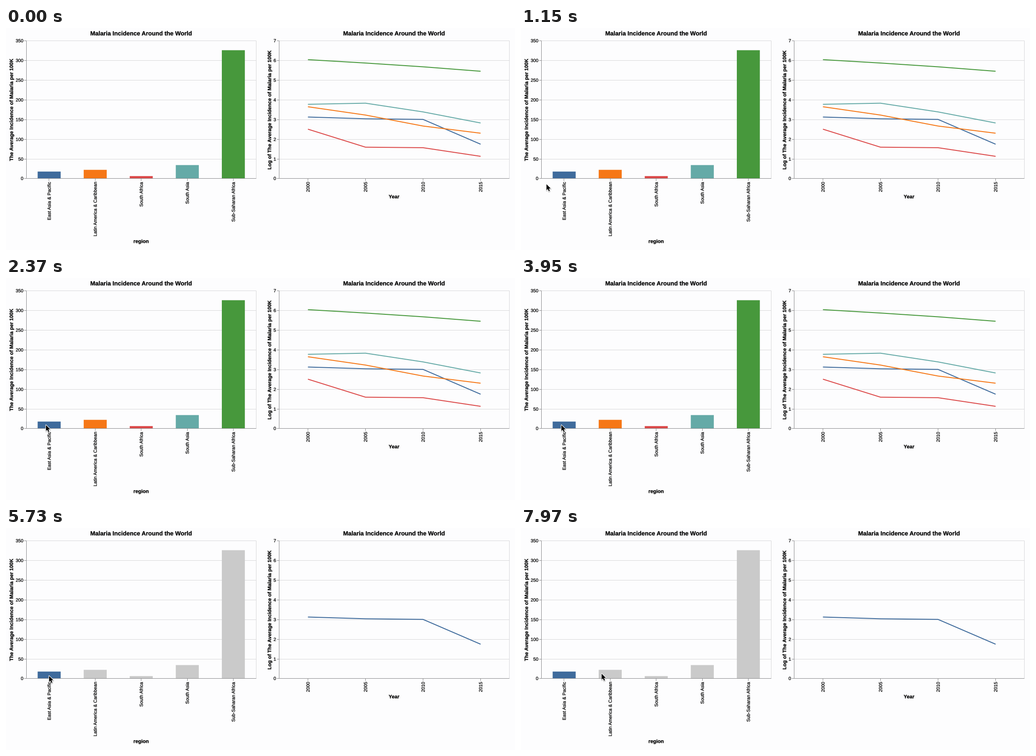
A matplotlib script that plays this animation: 1132 by 495 pixels, repeating every 7990 ms.

```python
import numpy as np
import matplotlib.pyplot as plt
from matplotlib.animation import FuncAnimation
from matplotlib.patches import PathPatch, Polygon, Rectangle
from matplotlib.textpath import TextPath
from matplotlib.transforms import Affine2D

W, H, DPI = 1132, 495, 100
FRAMES, STEP = 235, 34
SELECT_AT = 5500

PX = 72 / DPI
TOP, BASE = 28.9, 335.9
LEFT_X, RIGHT_X, PLOT_W = 45, 607.5, 512
GRID, AXIS, MUTED = "#d7d7d9", "#88888a", "#cacaca"

# name, colour, bar value, log values for each year
REGIONS = [
    ("East Asia & Pacific", "#3f6b9c", 18, (3.133, 3.044, 3.012, 1.751)),
    ("Latin America & Caribbean", "#f67716", 22.4, (3.655, 3.233, 2.675, 2.31)),
    ("South Africa", "#dc4a4a", 6.5, (2.515, 1.6, 1.573, 1.135)),
    ("South Asia", "#65aaa7", 34.5, (3.78, 3.837, 3.393, 2.83)),
    ("Sub-Saharan Africa", "#47983c", 326.5, (6.05, 5.878, 5.686, 5.46)),
]
YEARS = (2000, 2005, 2010, 2015)

# time, x and y of the pointer tip
PATH = np.array([
    (780, -12, 379), (1150, 57, 347), (1230, 57, 347), (1600, 88, 327),
    (2510, 88, 327), (3230, 89, 327), (4610, 89, 327), (5190, 95, 329),
    (7250, 95, 329), (7990, 179, 324),
])
ARROW = np.array([
    (0.8, 0.8), (0.8, 14.2), (3.8, 11.4), (5.9, 16.4),
    (8.2, 15.4), (6.1, 10.5), (10.2, 10.3),
])

fig = plt.figure(figsize=(W / DPI, H / DPI), dpi=DPI, facecolor="#fdfdfe")
ax = fig.add_axes([0, 0, 1, 1])
ax.set_xlim(0, W)
ax.set_ylim(H, 0)
ax.axis("off")


def crisp(v):
    return np.floor(v) + 0.5


def scale_y(value, top_value):
    return BASE - (BASE - TOP) * value / top_value


def rule(x0, y0, x1, y1, color, z):
    ax.plot([x0, x1], [y0, y1], color=color, lw=PX, zorder=z,
            solid_capstyle="butt", snap=False)


def label(x, y, text, size=10.24, align=0.5, bold=False, upright=False):
    """Text as outlines; align runs from 0 (start) to 1 (end) of the line."""
    font = {"family": "Liberation Sans", "weight": "bold" if bold else "normal"}
    path = TextPath((0, 0), text, size=size, prop=font)
    box = path.get_extents()
    place = Affine2D().translate(-box.x0 - align * box.width, 0).scale(1, -1)
    if upright:
        place.rotate_deg(-90)
    place.translate(x, y)
    ax.add_patch(PathPatch(place.transform_path(path), fc="black", ec="black",
                           lw=0.3 * PX, zorder=5, snap=False))


def draw_frame(x0, top_value, tick, y_title, y_title_x, x_title, x_title_y):
    left, right, bottom = crisp(x0), crisp(x0 + PLOT_W - 0.5), crisp(BASE)
    for value in range(0, top_value + 1, tick):
        y = crisp(scale_y(value, top_value))
        rule(left, y, right, y, GRID, 1)
        rule(left - 5, y, left, y, AXIS, 4)
        label(left - 7.3, y + 3.4, str(value), align=1)
    rule(right, crisp(TOP), right, bottom, GRID, 1)
    rule(left, crisp(TOP), left, bottom, AXIS, 4)
    rule(left, bottom, right, bottom, AXIS, 4)
    mid = x0 + PLOT_W / 2 - 0.5
    label(mid, 16.5, "Malaria Incidence Around the World", 13.31, bold=True)
    label(mid, x_title_y, x_title, 11.26, bold=True)
    label(y_title_x, 182.5, y_title, 11.26, bold=True, upright=True)


def x_tick(x, text):
    rule(crisp(x), BASE, crisp(x), BASE + 5, AXIS, 4)
    label(x + 3.6, 343.4, text, align=1, upright=True)


draw_frame(LEFT_X, 350, 50, "The Average Incidence of Malaria per 100K", 15.8,
           "region", 479.3)
draw_frame(RIGHT_X, 7, 1, "Log of The Average Incidence of Malaria per 100K",
           589.8, "Year", 379.8)

band = PLOT_W / len(REGIONS)
year_x = [RIGHT_X + PLOT_W * (i + 0.5) / len(YEARS) for i in range(len(YEARS))]
bars, lines = [], []
for i, (name, color, value, logs) in enumerate(REGIONS):
    x = LEFT_X + band * (i + 0.5)
    y = scale_y(value, 350)
    bar = Rectangle((x - band / 4 - 0.2, y), band / 2, BASE - y, fc=color,
                    lw=0, zorder=2, snap=False)
    bars.append(ax.add_patch(bar))
    x_tick(x - 0.3, name)
    lines += ax.plot(year_x, [scale_y(v, 7) for v in logs], color=color,
                     lw=2.05 * PX, solid_capstyle="butt",
                     solid_joinstyle="miter", zorder=3)
for x, year in zip(year_x, YEARS):
    x_tick(x, str(year))


def pointer_part(z, **style):
    return ax.add_patch(Polygon(ARROW, closed=True, zorder=z, snap=False,
                                joinstyle="round", **style))


shadow = pointer_part(8, fc="black", ec="black", lw=3 * PX, alpha=0.18)
outline = pointer_part(9, fc="white", ec="white", lw=2.2 * PX)
arrow = pointer_part(10, fc="black", lw=0)


def pointer_at(t):
    times = PATH[:, 0]
    if t <= times[0]:
        return PATH[0, 1:]
    i = min(np.searchsorted(times, t, side="right"), len(PATH) - 1)
    a, b = PATH[i - 1], PATH[i]
    u = min((t - a[0]) / (b[0] - a[0]), 1)
    u = u * u * (3 - 2 * u)
    return a[1:] + (b[1:] - a[1:]) * u


def update(frame):
    t = frame * STEP
    tip = ARROW + pointer_at(t)
    arrow.set_xy(tip)
    outline.set_xy(tip)
    shadow.set_xy(tip + (0.3, 1.4))
    selected = t >= SELECT_AT
    for i, (bar, line) in enumerate(zip(bars, lines)):
        keep = i == 0 or not selected
        bar.set_facecolor(REGIONS[i][1] if keep else MUTED)
        line.set_visible(keep)
    return [*bars, *lines, shadow, outline, arrow]


anim = FuncAnimation(fig, update, frames=FRAMES, interval=STEP, repeat=True,
                     repeat_delay=0, blit=False)
plt.show()
```
